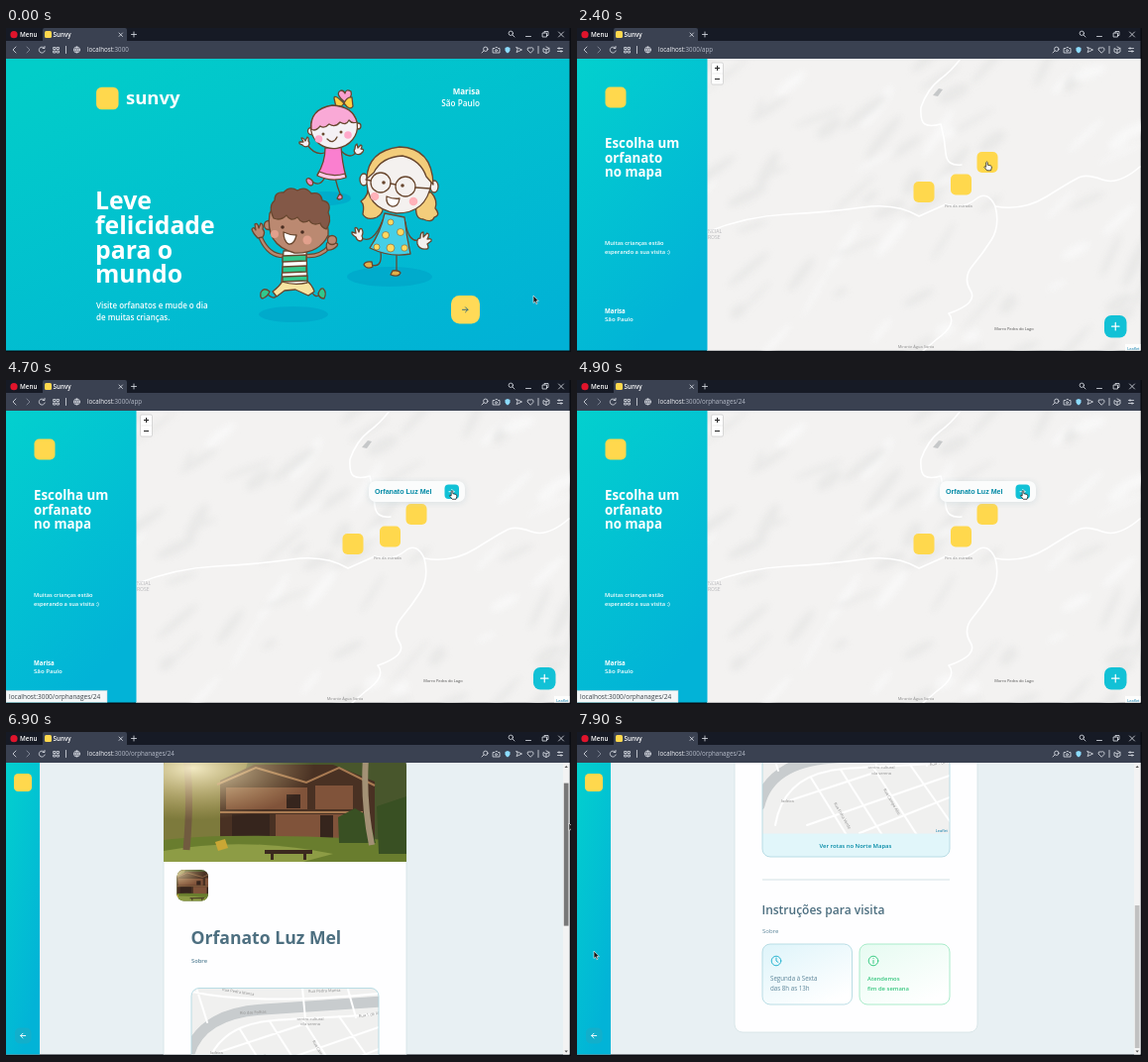
An HTML page for the animation above (8000 ms loop, 570x327 px).

```html
<!DOCTYPE html>
<html lang="pt-BR">
<head>
<meta charset="utf-8">
<title>Sunvy</title>
<style>
  html, body { margin: 0; width: 100%; height: 100%; overflow: hidden; background: #0b0d12; }
  svg { display: block; width: 100vw; height: 100vh; }
  text { font-family: "Open Sans", "Noto Sans", sans-serif; font-weight: 600; white-space: pre; }
  .bold { font-weight: 700; }
  .thin { font-weight: 400; }
  .arial { font-family: "Liberation Sans", Arial, sans-serif; font-weight: 700; }
  .white { fill: #fff; }
  .slate { fill: #4d6f80; }
  .mid { text-anchor: middle; }
  .end { text-anchor: end; }
  .line { fill: none; stroke-linecap: round; stroke-linejoin: round; }
  .ink { stroke: #68472f; stroke-width: 1.3; stroke-linecap: round; stroke-linejoin: round; }
  .tiny { font-size: 4px; fill: #8c8c8c; font-weight: 400; }
</style>
</head>
<body>
<svg viewBox="0 0 570 327" preserveAspectRatio="none">
  <defs>
    <linearGradient id="sea" x1="0.1" y1="0" x2="0.9" y2="1">
      <stop offset="0" stop-color="#02cdc9"/><stop offset="1" stop-color="#01b1d6"/>
    </linearGradient>
    <linearGradient id="seaTall" x1="0" y1="0" x2="0.5" y2="1">
      <stop offset="0" stop-color="#03d0ce"/><stop offset="1" stop-color="#02b3d7"/>
    </linearGradient>
    <linearGradient id="blueCard" x1="0" y1="0" x2="0.7" y2="1">
      <stop offset="0" stop-color="#def4fa"/><stop offset="1" stop-color="#fff"/>
    </linearGradient>
    <linearGradient id="greenCard" x1="0" y1="0" x2="0.7" y2="1">
      <stop offset="0" stop-color="#e6fbf1"/><stop offset="1" stop-color="#fff"/>
    </linearGradient>
    <radialGradient id="glare" cx="0.12" cy="0.1" r="0.5">
      <stop offset="0" stop-color="#fff6d2" stop-opacity="0.9"/><stop offset="1" stop-color="#e9c98a" stop-opacity="0"/>
    </radialGradient>
    <filter id="soft" x="-20%" y="-20%" width="140%" height="140%"><feGaussianBlur stdDeviation="3"/></filter>
    <clipPath id="window"><path d="M0 0H568.5V325.5H0Z"/></clipPath>
    <clipPath id="page"><path d="M0 31H568.5V325.5H0Z"/></clipPath>
    <clipPath id="cityClip"><rect x="187" y="286" width="189" height="98.5"/></clipPath>
    <clipPath id="photoClip"><path d="M159 159V62Q159 54 167 54H396Q404 54 404 62V159Z"/></clipPath>
    <clipPath id="thumbClip"><rect x="172.5" y="167" width="31.5" height="31.5" rx="7"/></clipPath>
    <g id="photoArt">
      <path fill="#48562c" d="M159 54H404V159H159Z"/>
      <path fill="#7d7a3c" d="M159 54H245L222 140H159Z"/>
      <path fill="#493123" d="M216 77 250 61H330L372 78V138H216Z"/>
      <path fill="#80533a" d="M222 84H304V106H222ZM272 111H356V136H272ZM312 82H350V106H312Z"/>
      <path fill="#36251d" d="M228 111H266V136H228ZM283 91H297V105H283ZM317 112H330V136H317Z"/>
      <path stroke="#a87a52" stroke-width="2" fill="none" d="M213 81 252 64 303 79 336 64 372 82M216 109H360"/>
      <path fill="#697d2e" d="M159 137Q230 128 404 138V159H159Z"/>
      <path fill="#8d9c45" d="M159 148Q240 133 330 151L300 159H159Z"/>
      <path fill="#395023" d="M335 114 352 105 366 113 373 140H336ZM374 103 404 93V151H376Z"/>
      <path stroke="#715b3f" stroke-width="7" fill="none" d="M182 147Q187 94 182 54"/>
      <path stroke="#a39175" stroke-width="6" fill="none" d="M369 142Q360 98 363 54"/>
      <path fill="#3b291e" d="M261 147H309V151H303V157H300V151H270V157H267V151H261Z"/>
      <path fill="#c9a735" d="M211 139 221 136 224 145 214 148Z"/>
      <path fill="url(#glare)" d="M159 54H404V159H159Z"/>
    </g>
    <rect id="mark" x="-10.5" y="-10.5" width="21" height="21" rx="5" fill="#ffd84d"/>
  </defs>

  <!-- browser frame -->
  <g clip-path="url(#window)">
    <path fill="#161a25" d="M0 0H570V14H0Z"/>
    <path fill="#3a4151" d="M37 14V2Q37 0 39 0H120Q122 0 122 2V14ZM0 13H570V31H0Z"/>
    <circle cx="8" cy="6.7" r="3.6" fill="#e0142c"/>
    <rect x="39" y="3" width="7" height="7" rx="1.5" fill="#ffd84d"/>
    <text class="white" x="14" y="9" font-size="6.3">Menu</text>
    <text class="white" x="47.5" y="9" font-size="6.3">Sunvy</text>
    <g class="line" stroke="#dfe3ea" stroke-width="0.8">
      <path d="M114 5l3.5 3.5m0-3.5L114 8.5M126.500 6.500h5M129 4v5M524.500 8.500h5M541.500 5h4v4h-4zM543 5V3.500h4v4h-1.500M557.500 4l5 5m0-5l-5 5M511 7l2 2"/>
      <circle cx="509.300" cy="5.300" r="2.200"/>
      <path stroke="#8d93a3" d="M21 19l3 3-3 3"/>
      <path d="M10 19l-3 3 3 3M38.500 20a3 3 0 1 0 .7 3M39 18.500v2h-2M48 19.500h2v2h-2zm3.500 0h2v2h-2zM48 23h2v2h-2zm3.500 0h2v2h-2zM60.500 18.500v7M68.500 22h6M71.500 19q-2.500 3 0 6 2.500-3 0-6"/>
      <circle cx="71.500" cy="22" r="3"/>
      <circle cx="483.800" cy="21.300" r="2.200"/>
      <path d="M482 23l-2 2M491.500 20.500h1.500l1-1h1.500l1 1h1.500v4.500h-6.500zM515 19.500l5.500 2.500-5.500 2.500 1-2.500zM529 25l-3-3q-.5-3 3-2 3.500-1 3 2zM537 18.500v7M545 19l3 1.500v3.500l-3 1.500-3-1.500v-3.500l3 1.500 3-1.500M545 22v3.500M556.500 20.500h5M556.500 23.500h5M558 19.700v1.600M560 22.700v1.600"/>
      <circle cx="494.500" cy="22.700" r="1"/>
    </g>
    <path fill="#8cdcff" d="M503.500 20l2.500-1 2.500 1v2.500q-.5 2-2.500 3-2-1-2.500-3z"/>
    <text class="thin" x="82" y="24.300" font-size="6.200" fill="#f2f4f8">localhost<tspan fill="#b5bbc8">:3000<tspan id="path"></tspan></tspan></text>
  </g>

  <g clip-path="url(#page)">
    <!-- landing page -->
    <g id="home">
      <path fill="url(#sea)" d="M0 31H570V327H0Z"/>
      <use href="#mark" transform="translate(102.300 71) scale(1.070)"/>
      <text class="white bold" x="121" y="77" font-size="18.500">sunvy</text>
      <text class="white bold end" x="478" y="67" font-size="8">Marisa</text>
      <text class="white end" x="478" y="79" font-size="8.200">São Paulo</text>
      <g class="white" font-size="24.800">
        <text class="bold" x="90" y="183">Leve</text><text class="bold" x="90" y="207.700">felicidade</text>
        <text class="bold" x="90" y="232.500">para o</text><text class="bold" x="90" y="257">mundo</text>
      </g>
      <g class="white" font-size="8"><text x="91" y="283">Visite orfanatos e mude o dia</text><text x="91" y="294.500">de muitas crianças.</text></g>
      <g fill="#00a5c9" opacity="0.7">
        <ellipse cx="323" cy="172" rx="25" ry="7"/><ellipse cx="387" cy="251" rx="43" ry="10"/><ellipse cx="290" cy="289" rx="35" ry="8"/>
      </g>

      <!-- girl with a bow -->
      <g class="ink" fill="#f4f1f5">
        <path fill="none" d="M321 126Q312 129 304 118M338 124Q348 134 354 124M322 150Q317 161 309 155M332 151Q334 160 338 170"/>
        <path d="M305 119q-4 2-6-1-4-1-3-3l4 0-2-4q2-1 4 3l2-4q2 1 1 4 2 2 0 5zM353 127q-3-3-1-5 0-4 2-5l1 4 3-3q2 1 0 4 4 0 2 3-3 4-7 2z"/>
        <path fill="#f48bbb" d="M309 154q-4-4-6-1 0 4 4 6 4 0 2-5zM336 168q4 0 3 4-3 2-5 0z"/>
        <path fill="#fa7fcf" d="M322 121 338 119Q339 136 343 150 329 156 314 148 322 136 322 121Z"/>
        <path fill="#ffc8e6" d="M316 145Q329 151 342 147L343 151Q329 156 314 149Z"/>
        <path fill="#f9a0d0" d="M342 75Q331 66 338 63 341 63 342 66 343 61 348 64 350 70 342 75Z"/>
        <path fill="#ffcf45" d="M341 76Q331 66 331 71L333 80Q337 82 341 76 347 84 350 79L349 70Q344 69 341 76Z"/>
        <circle cx="308" cy="104" r="3.500"/><circle cx="355" cy="99" r="3"/>
        <ellipse cx="331" cy="100" rx="23.500" ry="21.500" transform="rotate(-8 331 100)"/>
        <path fill="#f9a9d6" d="M308 102Q306 82 329 78 350 79 354 95 349 97 346 93 343 99 337 95 332 101 326 97 321 102 317 99 312 105 308 102Z"/>
        <path fill="none" d="M324 112Q330 118 334 110"/>
      </g>
      <g fill="#68472f"><circle cx="320" cy="107" r="1.500"/><circle cx="338" cy="105" r="1.500"/></g>
      <g fill="#ffa9cb"><circle cx="315.500" cy="112" r="3.800"/><circle cx="345" cy="108" r="3.800"/></g>

      <!-- girl with glasses -->
      <g class="ink" fill="#f4f1ef" stroke-width="1.500">
        <path fill="none" d="M380 194Q370 220 357 211M403 196Q406 217 417 214M378 226Q380 243 368 239M394 228V246"/>
        <path d="M358 215q-4 0-5-4-5-3-4-5l4 1-1-5q2-2 4 4 1-5 3-3 2 3 0 7 2 3-1 5zM415 218q-1-6 3-6 0-6 3-6v5l4-4q3 1 0 6 5-1 4 2l-4 3q2 4 0 5-8 1-10-5z"/>
        <path fill="#e2b04a" d="M369 236q-7-1-8 3 3 5 9 2zM390 245q6-1 8 2-2 5-10 2z"/>
        <path fill="#f3cd7b" d="M365 157Q367 169 358 175 362 178 360 188 364 195 374 191 382 187 380 177L414 178Q412 193 421 193 430 197 432 191 439 189 433 182 436 174 429 166Z"/>
        <path fill="#45cfe7" d="M382 187 402 191Q404 210 408 228 388 232 367 222 378 206 382 187Z"/>
        <ellipse cx="361" cy="153" rx="4" ry="6"/><ellipse cx="432" cy="160" rx="4" ry="6"/>
        <path d="M364 150Q368 123 399 122 427 126 429 157 424 187 394 187 362 182 364 150Z"/>
        <path fill="#f3cd7b" d="M400 129Q379 130 371 146L364 152Q365 124 397 120 430 121 431 158L424 150Q418 133 400 129Z"/>
        <g fill="none"><circle cx="378" cy="156" r="10"/><circle cx="403" cy="160" r="10"/><path d="M388 157l5 1M413 161l15 1M368 154l-5-1"/></g>
        <path fill="#fff" d="M384 170Q391 173 397 172 396 181 389 180 383 178 384 170Z"/>
      </g>
      <g fill="#ffd95f" stroke="#68472f" stroke-width="0.500"><circle cx="388" cy="196" r="3"/><circle cx="398" cy="206" r="3.500"/><circle cx="383" cy="209" r="3.500"/><circle cx="374" cy="221" r="3"/><circle cx="388" cy="222" r="4"/><circle cx="402" cy="222" r="3.200"/></g>
      <g fill="#68472f"><circle cx="381" cy="156" r="1.800"/><circle cx="400" cy="159" r="1.800"/></g>
      <g fill="#ffb2ba"><circle cx="372" cy="170" r="4.300"/><circle cx="411" cy="175" r="4.300"/></g>

      <!-- running boy -->
      <g class="ink" fill="#bb8971">
        <path fill="none" stroke-width="4.500" d="M280 230Q265 230 257 212M303 230Q317 231 326 221"/>
        <path fill="none" stroke="#bb8971" stroke-width="2.300" d="M280 230Q265 230 257 212M303 230Q317 231 326 221"/>
        <path fill="none" d="M273 267Q273 276 264 269M309 267Q312 273 317 269"/>
        <path d="M254 212q-5-5-6-9 2-3 4 1l-1-6q3-2 4 4l2-5q3 1 2 6 3 3 0 8zM324 224q-2-7 1-8l0-6q3 0 3 5l4-4q3 2-1 6 5 0 3 3-5 5-10 4z"/>
        <path fill="#31c88d" d="M266 266q-6-5-9 1-1 6 2 6 5-2 7-7zM315 268q2-6 5-5 4 4 1 10-5 0-6-5z"/>
        <path fill="#f7e3a0" d="M280 254H302Q309 259 311 266L305 270 292 264 281 265 273 271 269 266Q276 261 280 254Z"/>
        <path fill="#fff" d="M280 225 303 224 304 257Q291 260 278 256Z"/>
        <path fill="#31c88d" d="M279 230 303 229V235L279 236ZM279 241 303 240V246L279 247ZM279 251 304 250V255L279 256Z"/>
        <circle cx="265" cy="199" r="4.500"/><circle cx="329" cy="214" r="4.500"/>
        <path d="M266 187Q276 169 304 178 327 190 325 209 316 228 291 227 261 219 266 187Z"/>
        <path fill="#835847" d="M270 192Q264 180 271 174 271 165 280 166 286 159 294 164 302 159 308 167 318 165 319 174 329 176 325 186 329 195 323 203 318 201 317 197 309 200 306 194 299 199 294 191 287 196 283 189 277 195 270 192Z"/>
        <path fill="#fff" d="M280 206Q286 209 293 209 291 219 285 218 280 215 280 206Z"/>
      </g>
      <g fill="#492d21"><circle cx="279" cy="201" r="1.800"/><circle cx="299" cy="206" r="1.800"/></g>
      <g fill="#e2a08c"><circle cx="271" cy="208" r="4"/><circle cx="304" cy="214" r="4.500"/></g>

      <rect id="go" x="449" y="270" width="29" height="28.500" rx="8.500" fill="#ffda57"/>
      <rect id="goHover" x="449" y="270" width="29" height="28.500" rx="8.500" fill="#8cf9f8"/>
      <path class="line" stroke="#40707a" d="M460.500 284.300h5.500m-2.500-2.500 2.500 2.500-2.500 2.500"/>
    </g>

    <!-- map page -->
    <g id="map">
      <path fill="#ebebeb" d="M131 31H570V327H131Z"/>
      <g id="tiles">
        <path fill="#f3f2f1" d="M131 31H570V327H131Z"/>
        <g id="hills" filter="url(#soft)" opacity="0.7"></g>
        <path fill="#c6c8c9" d="M359 68l6-7 4 1-5 7z"/>
        <g class="line" stroke="#fff" stroke-width="1.600">
          <path d="M387 31Q378 43 366 52T347 80Q346 94 351 97T367 97Q371 112 372 126T388 138M372 178Q390 183 402 173T422 180Q427 200 418 214T399 240 397 265 375 288Q384 299 363 314L348 327"/>
          <path d="M422 180Q450 185 474 170T506 151 530 153 568 140M131 206Q170 190 212 188T288 181 345 190L372 178"/>
        </g>
        <text class="tiny mid" x="385" y="181">Fim da estrada</text>
        <text class="tiny mid" x="441" y="304.500" style="fill:#555">Morro Pedra do Lago</text>
        <text class="tiny mid" x="342" y="323">Mirante Água Santa</text>
        <g fill="#b5b5b9" font-size="5"><text class="thin" x="132" y="207">NCIAL</text><text class="thin" x="132" y="213">ROSE</text></g>
      </g>
      <g id="pins">
        <use href="#mark" x="350" y="165.500"/><use href="#mark" x="387.500" y="158"/><use href="#mark" x="414" y="135.500"/>
      </g>
      <rect x="135.500" y="35" width="12" height="22" rx="1.500" fill="#fff" stroke="#c8c8c8" stroke-width="0.700"/>
      <path stroke="#222" fill="none" d="M139 40.500h5M141.500 38v5M139 51.500h5"/><path stroke="#ddd" stroke-width="0.500" d="M136 46h11"/>
      <path fill="#fff" opacity="0.8" d="M553 319H569V327H553Z"/>
      <text class="thin end" x="567.500" y="324.500" font-size="3.900" fill="#0078a8">Leaflet</text>
      <rect x="532" y="290" width="22.500" height="22.500" rx="7" fill="#12c1d6"/>
      <path class="line" stroke="#fff" stroke-width="1.200" d="M539.500 301.200h7.500m-3.750-3.750v7.500"/>
      <g id="popup">
        <rect x="366" y="103" width="97" height="21" rx="7" fill="#b7cbd2" opacity="0.45" filter="url(#soft)"/>
        <rect x="366" y="102" width="97" height="21" rx="7" fill="#fbfcfc"/>
        <text class="arial" x="372" y="115" font-size="7.100" fill="#0089a5">Orfanato Luz Mel</text>
        <rect x="442.500" y="105.500" width="14.500" height="14.500" rx="4" fill="#12c1d6"/>
        <path class="line" stroke="#fff" stroke-width="0.900" d="M447 112.700h5m-2.300-2.300 2.300 2.300-2.300 2.300"/>
      </g>
      <path fill="url(#seaTall)" d="M0 31H131.500V327H0Z"/>
      <use href="#mark" transform="translate(39 70)"/>
      <g class="white" font-size="13.300"><text class="bold" x="28" y="121">Escolha um</text><text class="bold" x="28" y="135.700">orfanato</text><text class="bold" x="28" y="150">no mapa</text></g>
      <g class="white" font-size="5.700"><text x="28" y="218.500">Muitas crianças estão</text><text x="28" y="228.300">esperando a sua visita :)</text></g>
      <g class="white" font-size="6.100"><text class="bold" x="28" y="287.500">Marisa</text><text x="28" y="296">São Paulo</text></g>
    </g>

    <!-- details page -->
    <g id="detail">
      <path fill="#e8f0f3" d="M0 31H570V327H0Z"/>
      <g id="sheet">
        <rect x="159" y="54" width="245" height="531" rx="8" fill="#fefeff" stroke="#d3e2e5" stroke-width="0.800"/>
        <g id="photos">
          <use href="#photoArt" clip-path="url(#photoClip)"/>
          <g clip-path="url(#thumbClip)"><use href="#photoArt" transform="translate(106.500 150.600) scale(.303)"/></g>
        </g>
        <text class="slate bold" x="186.500" y="242.500" font-size="17.600">Orfanato Luz Mel</text>
        <text x="187" y="261" font-size="5.800" fill="#5c8599">Sobre</text>
        <rect x="187" y="286.500" width="189" height="121.500" rx="8" fill="#e1f6fa"/>
        <g clip-path="url(#cityClip)">
          <rect x="187" y="286.500" width="189" height="121.500" rx="8" fill="#f0f0ef"/>
          <path class="line" stroke="#c8ccce" stroke-width="11" d="M184 356C192 322 225 310 260 308S330 303 380 300"/>
          <g class="line" stroke="#fff" stroke-width="2">
            <path d="M187 290Q250 304 376 292M200 376C206 340 230 324 262 320S340 317 376 312M236 328 272 386M266 320 308 386M299 318 343 386M336 315 376 372M215 351 300 323M232 376 376 326M285 384 376 348M345 288l8 28M192 286l11 35M299 286l3 32"/>
          </g>
          <text class="tiny" transform="translate(218 289) rotate(9)">Rua Pedra Mansa</text>
          <text class="tiny" transform="translate(305 291) rotate(-2)">Rua Pedra Mansa</text>
          <text class="tiny" transform="translate(236 313) rotate(-3)">Rio das Folhas</text>
          <text class="tiny" transform="translate(356 316) rotate(-8)">Rua 1 de Abril</text>
          <text class="tiny mid" x="307" y="319">centro cultural</text><text class="tiny mid" x="307" y="324.500">vila serena</text>
          <text class="tiny" x="206" y="353">ladeira</text>
          <text class="tiny" transform="translate(309 340) rotate(60)">Rua Campo Alto</text>
          <text class="tiny" transform="translate(259 354) rotate(60)">Rua Folha Verde</text>
          <text class="thin end" x="374" y="383" font-size="3.900" fill="#0078a8">Leaflet</text>
        </g>
        <rect x="187" y="286.500" width="189" height="121.500" rx="8" fill="none" stroke="#b3dae2" stroke-width="0.900"/>
        <text class="mid" x="281" y="399" font-size="5.900" fill="#0089a5">Ver rotas no Norte Mapas</text>
        <path stroke="#d3e2e5" d="M187 431H376"/>
        <text class="slate" x="186.500" y="465.500" font-size="12">Instruções para visita</text>
        <text class="thin" x="187" y="485" font-size="6" fill="#5c8599">Sobre</text>
        <rect x="187" y="496" width="90.500" height="61" rx="8" fill="url(#blueCard)" stroke="#b3dae2" stroke-width="0.900"/>
        <rect x="285" y="496" width="91" height="61" rx="8" fill="url(#greenCard)" stroke="#a1e9c5" stroke-width="0.900"/>
        <g class="line" stroke="#2ab5d1"><circle cx="201" cy="513" r="4.800"/><path d="M201 510v3l2 1.500"/></g>
        <g class="line" stroke="#39cc83"><circle cx="299" cy="513" r="4.800"/><path d="M299 512.500v3M299 510.500v.1"/></g>
        <g font-size="6.200" fill="#5c8599"><text class="thin" x="195" y="532.800">Segunda à Sexta</text><text class="thin" x="195" y="542.500">das 8h as 13h</text></g>
        <g font-size="5.900" fill="#37c77f"><text x="293" y="532.800">Atendemos</text><text x="293" y="542.500">fim de semana</text></g>
      </g>
      <path fill="url(#seaTall)" d="M0 31H34V327H0Z"/>
      <use href="#mark" transform="translate(17 51) scale(.86)"/>
      <rect x="9" y="298.500" width="16.500" height="16" rx="5" fill="#12afcb"/>
      <path class="line" stroke="#fff" stroke-width="0.900" d="M19.700 306.500h-5m2.300-2.300-2.300 2.300 2.300 2.300"/>
      <path fill="#f3f3f3" d="M562 31H569V327H562Z"/>
      <path fill="#555" d="M563.500 36l1.700-2 1.700 2zM563.500 321.500l1.700 2 1.700-2z"/>
      <rect id="thumb" x="562.800" y="38" width="4.700" height="144"/>
    </g>

    <g id="status">
      <rect id="statusBox" y="313.500" height="13" fill="#f4f7f8" stroke="#c8d0d3" stroke-width="0.500"/>
      <text class="thin" id="statusText" x="3" y="322" font-size="6.500" fill="#3a4248"></text>
    </g>
  </g>

  <g id="cursor">
    <path id="arrow" fill="#151515" stroke="#fff" stroke-width="0.600" d="M0 0V7.500L1.700 6 2.900 8.700 4.100 8.100 3 5.600H5.300Z"/>
    <path id="hand" fill="#fff" stroke="#111" stroke-width="0.700" stroke-linejoin="round" d="M-.8 4.500V.7Q0-.6.8.7V3.200L4 4Q5 4.300 4.800 6L4 8.800H.2L-2.600 5.300Q-2.500 4-.8 5.300Z"/>
  </g>
</svg>
<script>
const LOOP = 8000, MAX_SCROLL = 282;
const el = id => document.getElementById(id);
const show = (id, amount) => {
  el(id).style.opacity = +amount;
  el(id).style.display = amount ? '' : 'none';
};
const ramp = (t, from, to) => Math.min(1, Math.max(0, (t - from) / (to - from)));
const between = (t, from, to) => t >= from && t < to;

// Keys are [time, ...values]; each stretch is eased at both ends.
function track(keys, t) {
  const next = keys.findIndex(key => key[0] > t);
  if (next < 0) return keys.at(-1).slice(1);
  const a = keys[next - 1], b = keys[next];
  const p = ramp(t, a[0], b[0]), eased = p * p * (3 - 2 * p);
  return a.slice(1).map((v, i) => v + (b[i + 1] - v) * eased);
}

const pointer = [
  [0, 532, 270], [400, 532, 270], [1100, 472, 288], [1600, 472, 288],
  [2150, 414, 180], [2400, 413.5, 135], [3150, 413.5, 135], [3900, 450, 111.5],
  [5150, 450, 111.5], [5850, 568, 72], [6300, 568, 72], [6500, 568, 79],
  [6900, 568, 92], [7400, 568, 216], [7500, 568, 216], [7850, 17, 221]
];
const scrolling = [[0, 0], [6500, 0], [6900, 28], [7400, MAX_SCROLL]];

let seed = 11;
const random = () => (seed = seed * 16807 % 2147483647) / 2147483647;
for (let i = 0; i < 75; i++) {
  const x = 131 + random() * 437, y = 31 + random() * 296;
  const hill = document.createElementNS('http://www.w3.org/2000/svg', 'ellipse');
  const look = {
    rx: 8 + random() * 22, ry: 2 + random() * 5, fill: random() < 0.7 ? '#e5e5e4' : '#fafafa',
    transform: `translate(${x} ${y}) rotate(${-65 + random() * 50})`
  };
  for (const name in look) hill.setAttribute(name, look[name]);
  el('hills').append(hill);
}

function draw(t) {
  show('home', t < 1650);
  show('map', between(t, 1650, 5100));
  show('detail', t >= 5100);
  show('goHover', ramp(t, 950, 1150));
  show('tiles', ramp(t, 1750, 2000));
  show('pins', t >= 1750);
  show('popup', ramp(t, 2950, 3150));
  show('photos', t >= 6400);

  el('path').textContent = t < 1400 ? '' : t < 4900 ? '/app' : '/orphanages/24';
  const leaving = t > 3000;
  el('statusText').textContent = 'localhost:3000/' + (leaving ? 'orphanages/24' : 'app');
  el('statusBox').setAttribute('width', leaving ? 102 : 66);
  show('status', leaving
    ? ramp(t, 3950, 4100) * (1 - ramp(t, 5100, 5300))
    : ramp(t, 1000, 1150) * (1 - 0.4 * ramp(t, 1400, 1500)) * (t < 1650));

  const [scroll] = track(scrolling, t);
  el('sheet').setAttribute('transform', `translate(0 ${-scroll})`);
  el('thumb').setAttribute('y', 38 + scroll * 137 / MAX_SCROLL);
  el('thumb').setAttribute('fill', between(t, 6450, 7500) ? '#787878' : between(t, 5800, 6450) ? '#a8a8a8' : '#c1c1c1');

  const [x, y] = track(pointer, t);
  el('cursor').setAttribute('transform', `translate(${x} ${y})`);
  const overLink = between(t, 950, 1650) || between(t, 2330, 3250) || between(t, 3750, 5100);
  show('hand', overLink);
  show('arrow', !overLink);
}

function tick() {
  draw(performance.now() % LOOP);
  requestAnimationFrame(tick);
}
tick();
</script>
</body>
</html>
```
